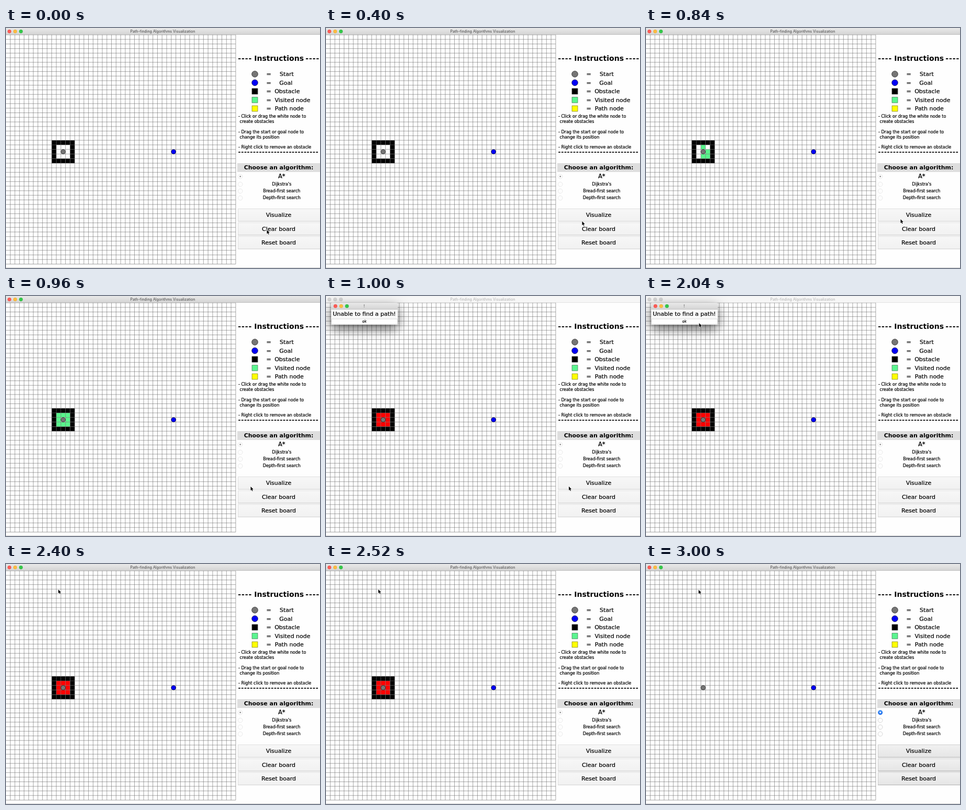
An HTML page with a canvas for the animation above (4.2 s loop, 600x460 px).

```html
<!DOCTYPE html>
<html lang="en">
<head>
<meta charset="utf-8">
<title>Path-finding Algorithms Visualization</title>
<style>
html, body { margin: 0; width: 100%; height: 100%; overflow: hidden; background: #fefefe; }
canvas { display: block; }
</style>
</head>
<body>
<canvas id="stage"></canvas>
<script>
const W = 600, H = 460, LOOP = 4200, STEP = 40;
const canvas = document.getElementById('stage');
const ctx = canvas.getContext('2d');
const ratio = window.devicePixelRatio || 1;
canvas.width = W * ratio;
canvas.height = H * ratio;
canvas.style.width = W + 'px';
canvas.style.height = H + 'px';

const SANS = '"DejaVu Sans", sans-serif';
const PX = 600 / 1024; // one window pixel on the scaled stage
const GRID = { x: -0.6, y: 13.05, n: 50, cell: 15 * PX };
const START = [12, 25], GOAL = [36, 25];
const VISITS = [[13, 25], [12, 24], [13, 26], [12, 26], [13, 24], [11, 25], [11, 24], [11, 26]];
const VISIT_AT = 700, VISIT_STEP = 36;
const ALERT_AT = 980, ALERT_END = 2280, CLEAR_AT = 2760;

// time, x, y of the pointer tip
const POINTER = [
  [0, 498.5, 387], [520, 488, 368], [600, 488, 368], [840, 486.5, 366.5],
  [1000, 464, 365], [1120, 312, 301], [1280, 312, 301], [1480, 147, 124],
  [1640, 147, 124], [2040, 101.5, 52], [2200, 100, 49.5], [2280, 100, 49],
  [2720, 100, 48.5], [3000, 100.5, 49.5]
];

const clamp = v => Math.max(0, Math.min(1, v));
const ease = v => v * v * (3 - 2 * v);

function pointerAt(t) {
  const i = POINTER.findIndex(k => k[0] > t);
  if (i < 0) return POINTER[POINTER.length - 1].slice(1);
  const a = POINTER[i - 1], b = POINTER[i];
  const p = ease((t - a[0]) / (b[0] - a[0]));
  return [a[1] + (b[1] - a[1]) * p, a[2] + (b[2] - a[2]) * p];
}

function rect(x, y, w, h, fill, stroke, width = 1) {
  ctx.fillStyle = fill;
  ctx.fillRect(x, y, w, h);
  if (stroke) {
    ctx.lineWidth = width;
    ctx.strokeStyle = stroke;
    ctx.strokeRect(x + width / 2, y + width / 2, w - width, h - width);
    ctx.lineWidth = 1;
  }
}

function disc(x, y, r, fill, stroke, width = 1) {
  ctx.beginPath();
  ctx.arc(x, y, r, 0, Math.PI * 2);
  ctx.fillStyle = fill;
  ctx.fill();
  if (stroke) {
    ctx.lineWidth = width;
    ctx.strokeStyle = stroke;
    ctx.stroke();
    ctx.lineWidth = 1;
  }
}

function label(str, x, y, size, { align = 'center', weight = 400, color = '#000', font = SANS, gap = 0 } = {}) {
  ctx.font = `${weight} ${size}px ${font}`;
  ctx.textAlign = align;
  ctx.letterSpacing = gap + 'px';
  ctx.fillStyle = color;
  const base = y + size * 0.365;
  ctx.fillText(str, x, base);
  if (font === SANS && weight === 400) {
    ctx.lineWidth = 0.22;
    ctx.lineJoin = 'round';
    ctx.strokeStyle = color;
    ctx.strokeText(str, x, base);
    ctx.lineWidth = 1;
  }
  ctx.letterSpacing = '0px';
}

function shade(y0, y1, top, bottom) {
  const g = ctx.createLinearGradient(0, y0, 0, y1);
  g.addColorStop(0, top);
  g.addColorStop(1, bottom);
  return g;
}

function lights(x, y, active) {
  const fills = active ? ['#fc5b57', '#fdbc40', '#34c84a'] : ['#d6d6d6', '#d6d6d6', '#d6d6d6'];
  const edges = active ? ['#e2463f', '#e0a030', '#27aa35'] : ['#c6c6c6', '#c6c6c6', '#c6c6c6'];
  fills.forEach((fill, i) => disc(x + i * 11, y, 3.3, fill, edges[i], 0.5));
}

function titleBar(active) {
  rect(0, 0, W, 13, active ? shade(0, 13, '#e9e9e9', '#d3d3d3') : '#f6f6f6');
  rect(0, 12.4, W, 0.6, active ? '#b4b4b4' : '#d4d4d4');
  lights(6.5, 6.6, active);
  label('Path-finding Algorithms Visualization', 299.5, 6.6, 7.1,
    { font: 'Inter, sans-serif', color: active ? '#404040' : '#adadad' });
}

function fillCell([c, r], color) {
  const s = GRID.cell;
  rect(GRID.x + c * s, GRID.y + r * s, s, s, color);
}

function node([c, r], color) {
  const s = GRID.cell;
  disc(GRID.x + (c + 0.5) * s, GRID.y + (r + 0.5) * s, s / 2, color, '#000', PX);
}

function board(t) {
  const { x, y, n, cell } = GRID, size = n * cell;
  rect(x, y, size, size, '#fff');
  if (t < CLEAR_AT) {
    for (let c = 10; c < 15; c++) {
      for (let r = 23; r < 28; r++) {
        const wall = Math.max(Math.abs(c - START[0]), Math.abs(r - START[1])) === 2;
        if (wall) fillCell([c, r], '#000');
        else if (t >= ALERT_AT) fillCell([c, r], '#f00');
      }
    }
    if (t >= VISIT_AT && t < ALERT_AT) {
      const count = Math.floor((t - VISIT_AT) / VISIT_STEP) + 1;
      VISITS.slice(0, count).forEach(p => fillCell(p, '#58f58c'));
    }
  }
  ctx.beginPath();
  for (let i = 0; i <= n; i++) {
    const d = i * cell;
    ctx.moveTo(x + d, y);
    ctx.lineTo(x + d, y + size);
    ctx.moveTo(x, y + d);
    ctx.lineTo(x + size, y + d);
  }
  ctx.lineWidth = PX;
  ctx.strokeStyle = '#686868';
  ctx.stroke();
  ctx.lineWidth = 1;
  node(START, '#757575');
  node(GOAL, '#0000f5');
}

function legend() {
  const head = { weight: 700, align: 'left', gap: 0.9 };
  label('----', 443.3, 57.9, 14, head);
  label('Instructions', 521.6, 57.9, 14, { weight: 700 });
  label('----', 572.3, 57.9, 14, head);

  const names = ['Start', 'Goal', 'Obstacle', 'Visited node', 'Path node'];
  const colors = ['#757575', '#0000f5', '#000', '#5bf58f', '#ffff00'];
  const centers = [536.5, 534.8, 537.3, 547.5, 541.3];
  names.forEach((name, i) => {
    const y = 88.3 + i * 16.5;
    if (i < 2) disc(475.5, y, 10 * PX, colors[i], '#000', PX);
    else rect(469.8, y - 5.6, 11.4, 11.4, colors[i], '#555', PX);
    label('=', 502, y, 11);
    label(name, centers[i], y, 11);
  });

  const notes = [
    ['- Click or drag the white node to', 444, 169], ['create obstacles', 446.5, 179],
    ['- Drag the start or goal node to', 444, 198.7], ['change its position', 446.5, 208.7],
    ['- Right click to remove an obstacle', 444, 228.5]
  ];
  notes.forEach(([s, x, y]) => label(s, x, y, 8, { align: 'left' }));
  label('-'.repeat(27), 443.5, 237.3, 12, { weight: 700, align: 'left', gap: 0.72 });
}

function radio(y, chosen, live) {
  disc(447.7, y, 4.3, '#fdfdfd', live > 0 ? '#c4c4c4' : '#e0e0e0', 0.7);
  if (!chosen) return;
  disc(447.7, y, 1.4, '#8e8e8e');
  if (live > 0) {
    ctx.globalAlpha = live;
    disc(447.7, y, 4.5, shade(y - 4.5, y + 4.5, '#4a98f8', '#1668ee'));
    disc(447.7, y, 1.6, '#fff');
    ctx.globalAlpha = 1;
  }
}

function controls(t) {
  const live = clamp((t - CLEAR_AT + STEP) / 240);
  rect(442, 259, 158, 17, '#dedede');
  label('Choose an algorithm:', 521, 266.8, 11, { weight: 700 });
  const options = ['A*', "Dijkstra's", 'Bread-first search', 'Depth-first search'];
  const rows = [284.3, 299.3, 312.3, 325.5];
  options.forEach((name, i) => {
    radio(rows[i] + 0.3, i === 0, live);
    label(name, 526.8, rows[i] - 0.3, i ? 8 : 11.5);
  });
  const [top, bottom] = live > 0 ? ['#f1f1f1', '#e5e5e5'] : ['#f7f7f7', '#f1f1f1'];
  ['Visualize', 'Clear board', 'Reset board'].forEach((name, i) => {
    const y = 346 + i * 26.5;
    rect(443, y, 158, 25, shade(y, y + 25, top, bottom), live > 0 ? '#cdcdcd' : '#dfdfdf');
    rect(443, y + 24, 157, 1, live > 0 ? '#b0b0b0' : '#d2d2d2');
    label(name, 521, y + 12.4, 11);
  });
}

function alertBox() {
  ctx.save();
  ctx.shadowColor = 'rgba(0,0,0,.6)';
  ctx.shadowBlur = 22 * ratio;
  ctx.shadowOffsetY = 8 * ratio;
  ctx.beginPath();
  ctx.roundRect(10, 13, 127, 42, 3);
  ctx.fillStyle = '#ececec';
  ctx.fill();
  ctx.restore();
  ctx.save();
  ctx.clip();
  rect(10, 13, 127, 13, shade(13, 26, '#e9e9e9', '#d3d3d3'));
  rect(10, 25.5, 127, 0.5, '#b4b4b4');
  rect(10, 26, 127, 17, '#f8f8f8');
  rect(10, 43.5, 127, 11, '#fff', '#dcdcdc');
  ctx.restore();
  lights(18, 19.4, true);
  label('!', 73, 19.4, 7.1, { font: 'Inter, sans-serif', color: '#404040' });
  label('Unable to find a path!', 73.2, 34.3, 11);
  label('ok', 73.3, 48.7, 7);
}

function pointer(t) {
  const [x, y] = pointerAt(t);
  const shape = [[0, 0], [0, 7.4], [1.7, 5.9], [2.9, 8.7], [4.1, 8.2], [2.9, 5.5], [5.2, 5.3]];
  ctx.beginPath();
  shape.forEach(([dx, dy]) => ctx.lineTo(x + dx, y + dy));
  ctx.closePath();
  ctx.lineWidth = 1.2;
  ctx.lineJoin = 'round';
  ctx.strokeStyle = '#fff';
  ctx.stroke();
  ctx.fillStyle = '#000';
  ctx.fill();
  ctx.lineWidth = 1;
}

function draw(t) {
  ctx.setTransform(ratio, 0, 0, ratio, 0, 0);
  rect(0, 0, W, H, '#fefefe');
  const alerted = t >= ALERT_AT && t < ALERT_END;
  board(t);
  titleBar(!alerted);
  legend();
  controls(t);
  rect(0, 459, W, 1, '#d2d2d2');
  if (alerted) alertBox();
  pointer(t);
}

const began = performance.now();
function frame() {
  const t = (performance.now() - began) % LOOP;
  draw(Math.floor(t / STEP) * STEP);
  requestAnimationFrame(frame);
}
frame();
</script>
</body>
</html>
```
